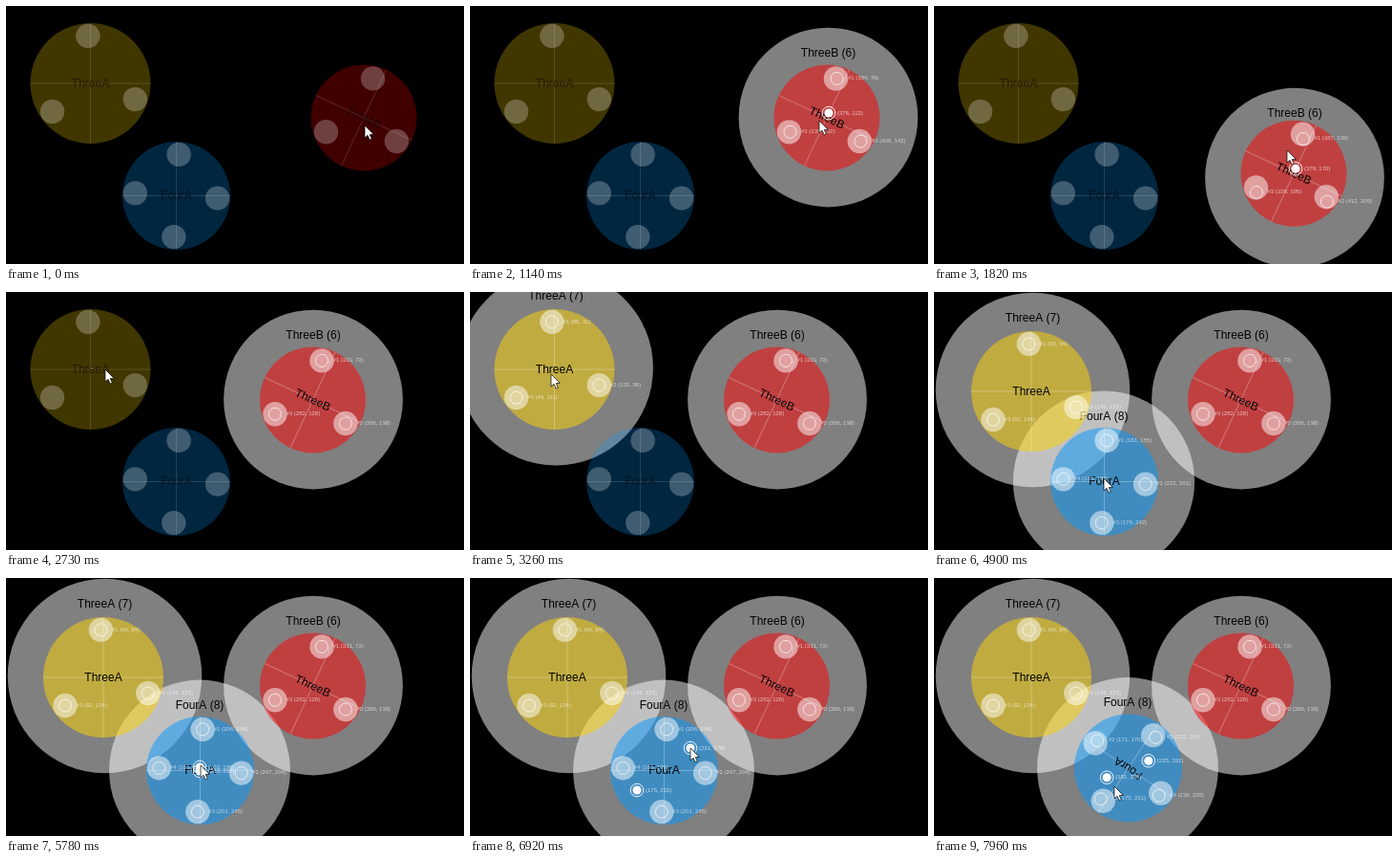
These frames come from a looping animation (480x270 px, 8 s). An HTML page with a canvas:

```html
<!DOCTYPE html>
<html>
<head>
<meta charset="utf-8">
<style>
html, body { margin: 0; width: 100%; height: 100%; overflow: hidden; background: #000; }
canvas { display: block; }
</style>
</head>
<body>
<canvas id="stage" width="480" height="270"></canvas>
<script>
const ctx = document.getElementById('stage').getContext('2d');
const LOOP = 8000, TAU = Math.PI * 2, RAD = Math.PI / 180;
const TOUCH_LAG = 130, FOLLOW_LAG = 70;
const PAIR_START = 5780, SPIN_START = 7092, SPIN_RATE = 0.246;
const PAIR_CENTER = [203, 200], PAIR_POINT = [231, 178];
const FONT = 'px "Liberation Sans", Arial, sans-serif';

// Angles of the contact pads around a body
const THREE = [-93, 19.5, 143.5], FOUR = [-86.5, 3.5, 93.5, 183.5];

// hover and grab are pointer places relative to the body centre, move is the drag distance
const yellow = {
  name: 'ThreeA', count: 7, color: '255,214,0', center: [88.5, 81], r: 63, feet: THREE, turn: 0, tilt: 0,
  halo: [1.5, -1.5], lit: 2730, hover: [16.5, 0], grab: [-3, 5], press: 3480, duration: 240, move: [13.5, 23]
};
const red = {
  name: 'ThreeB', count: 6, color: '255,0,0', center: [375, 117], r: 55.5, feet: THREE, turn: 16, tilt: 25,
  halo: [0.5, -0.5], lit: 80, hover: [1, 8], grab: [2, -5], press: 1000, duration: 1170, move: [-53.5, -4],
  bend: u => {
    const swell = Math.sin(Math.PI * u) ** 2;
    return [28.5 * swell - 18 * Math.sin(TAU * u), 66 * swell];
  }
};
const blue = {
  name: 'FourA', count: 8, color: '0,152,255', center: [178.5, 198.5], r: 56.5, feet: FOUR, turn: 0, tilt: 0,
  halo: [-0.5, 0], lit: 4370, hover: [-0.5, 4.5], grab: [-0.5, -3.5], press: 4920, duration: 300, move: [25, 3],
  spins: true
};
const items = [yellow, red, blue];

const add = (a, b) => [a[0] + b[0], a[1] + b[1]];
const sub = (a, b) => [a[0] - b[0], a[1] - b[1]];
const polar = (r, angle) => [r * Math.cos(angle), r * Math.sin(angle)];
const clamp = (v, lo, hi) => Math.min(hi, Math.max(lo, v));
const smooth = u => u * u * (3 - 2 * u);
const backOut = u => 1 + 2.70158 * (u - 1) ** 3 + 1.70158 * (u - 1) ** 2;
const release = item => item.press + item.duration + 250;

// Pointer journey: reach each item, settle on its grab point, drag it
const legs = [];
let arrival = 0;
for (const item of [red, yellow, blue]) {
  const grab = add(item.center, item.grab);
  legs.push(
    { start: arrival, end: item.lit - 70, to: add(item.center, item.hover) },
    { start: item.lit, end: item.lit + 400, to: grab },
    { start: item.press, end: item.press + item.duration, to: add(grab, item.move), bend: item.bend }
  );
  arrival = release(item);
}
legs.push({ start: 5700, end: 6210, to: PAIR_POINT });

function spinAngle(t) {
  const d = Math.max(0, t - SPIN_START);
  return -SPIN_RATE * RAD * (d < 150 ? d * d / 300 : d - 75);
}

function pointer(t) {
  if (t >= SPIN_START) {
    const radius = 35.5 - 12 * smooth(clamp((t - SPIN_START) / 650, 0, 1));
    return add(PAIR_CENTER, polar(radius, spinAngle(t) - 38.5 * RAD));
  }
  let place = legs[0].to;
  for (const leg of legs) {
    if (t < leg.start) break;
    const u = clamp((t - leg.start) / (leg.end - leg.start), 0, 1);
    const [dx, dy] = sub(leg.to, place);
    place = add(place, [dx * smooth(u), dy * smooth(u)]);
    if (leg.bend) place = add(place, leg.bend(u));
  }
  return place;
}

const touch = t => pointer(t - TOUCH_LAG);

// Halos and rings trail the body; turns are followed more tightly than drags
function pose(item, t, lag = 0) {
  const held = touch(clamp(t - lag, item.press, release(item)));
  const [x, y] = sub(held, item.grab);
  const spin = item.spins ? spinAngle(t - TOUCH_LAG - FOLLOW_LAG - lag / 4) : 0;
  return { x, y: y + spin, spin };
}

function footPlace(item, p, angle) {
  return add([p.x, p.y], polar(item.r - 13.3, (angle + item.turn) * RAD + p.spin));
}

function circle([x, y], r, fill, stroke) {
  ctx.beginPath();
  ctx.arc(x, y, Math.max(0, r), 0, TAU);
  if (fill) { ctx.fillStyle = fill; ctx.fill(); }
  if (stroke) { ctx.strokeStyle = stroke; ctx.stroke(); }
}

function text(str, x, y, size, color, align = 'center') {
  ctx.font = size + FONT;
  ctx.fillStyle = color;
  ctx.textAlign = align;
  ctx.textBaseline = 'middle';
  ctx.fillText(str, x, y);
}

const white = a => `rgba(255,255,255,${a})`;
const coords = ([x, y]) => `(${Math.round(x)}, ${Math.round(y)})`;
const growth = (item, t) => clamp((t - item.lit) / 550, 0, 1);

function drawHalo(item, t) {
  const p = pose(item, t, FOLLOW_LAG), scale = backOut(growth(item, t));
  const r = 1.05 * item.r + 35.6;
  if (scale <= 0) return;
  ctx.save();
  ctx.translate(p.x + item.halo[0], p.y + item.halo[1]);
  ctx.scale(scale, scale);
  circle([0, 0], r, white(0.5));
  text(`${item.name} (${item.count})`, 0, 27 - r, 12, '#000');
  ctx.restore();
}

function drawBody(item, t) {
  const p = pose(item, t), late = pose(item, t, FOLLOW_LAG);
  const lit = clamp(growth(item, t) * 2, 0, 1), alpha = 0.25 + 0.25 * lit;

  ctx.save();
  ctx.translate(p.x, p.y);
  ctx.rotate(p.spin + item.tilt * RAD);
  circle([0, 0], item.r, `rgba(${item.color},${alpha})`);
  ctx.strokeStyle = white(alpha * 0.55);
  ctx.beginPath();
  ctx.moveTo(-item.r, 0);
  ctx.lineTo(item.r, 0);
  ctx.moveTo(0, -item.r);
  ctx.lineTo(0, item.r);
  ctx.stroke();
  text(item.name, 0, 0.5, 12, `rgba(0,0,0,${0.5 + 0.5 * lit})`);
  ctx.restore();

  item.feet.forEach((angle, i) => {
    circle(footPlace(item, p, angle), 12.7, white(alpha));
    if (!lit) return;
    const ring = footPlace(item, late, angle);
    circle(ring, 6.5, null, white(0.7 * lit));
    text(`#${i + 1} ${coords(ring)}`, ring[0] + 11.5, ring[1] - 0.5, 6, white(0.65 * lit), 'left');
  });
}

function drawTouch(place) {
  circle(place, 4.5, '#fff');
  circle(place, 6.8, null, white(0.9));
  text(coords(place), place[0] + 9, place[1], 6, white(0.7), 'left');
}

function drawPointer([x, y]) {
  const outline = [[0, 0], [0, 13], [3, 10.3], [5.2, 15], [7.3, 14], [5.2, 9.6], [9.3, 9.4]];
  ctx.beginPath();
  outline.forEach(([dx, dy]) => ctx.lineTo(Math.floor(x) + dx, Math.floor(y) + dy));
  ctx.closePath();
  ctx.fillStyle = '#fff';
  ctx.fill();
  ctx.lineWidth = 0.7;
  ctx.strokeStyle = '#000';
  ctx.stroke();
  ctx.lineWidth = 1;
}

function draw(t) {
  ctx.fillStyle = '#000';
  ctx.fillRect(0, 0, 480, 270);
  items.forEach(item => drawHalo(item, t));
  items.forEach(item => drawBody(item, t));
  const finger = touch(t), pair = t >= PAIR_START;
  if (pair) drawTouch(sub(add(PAIR_CENTER, PAIR_CENTER), finger));
  if (pair || items.some(item => t >= item.press && t < release(item))) drawTouch(finger);
  drawPointer(pointer(t));
}

const start = performance.now();
function tick() {
  draw((performance.now() - start) % LOOP);
  requestAnimationFrame(tick);
}
tick();
</script>
</body>
</html>
```
